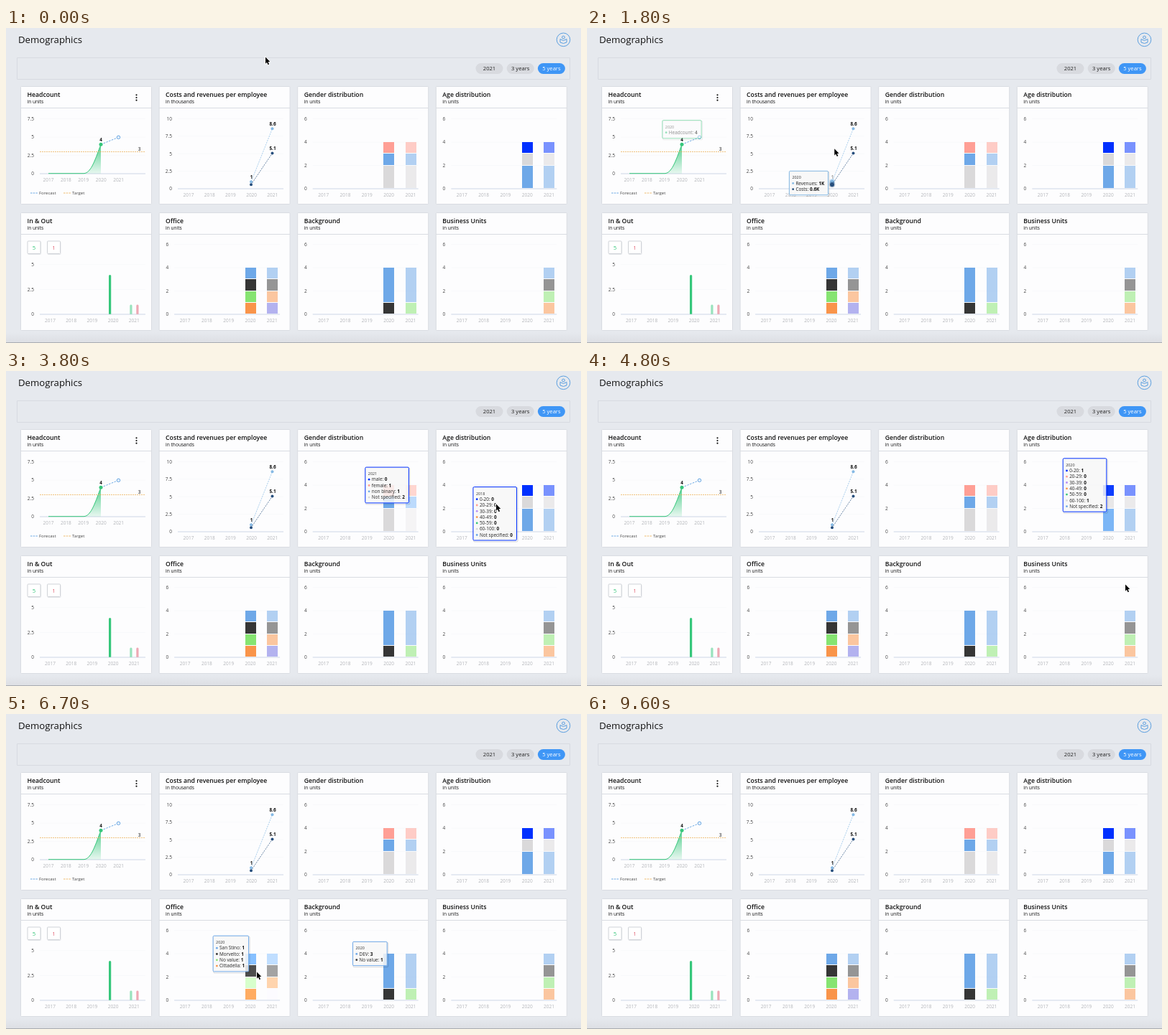
Animation of 800x439 px, one loop 9700 ms. Source, as an HTML page with a canvas:

```html
<!DOCTYPE html>
<html lang="en">
<head>
<meta charset="utf-8">
<title>Demographics</title>
<style>
html, body { margin: 0; width: 100%; height: 100%; overflow: hidden; background: #e6e9ee; }
canvas { display: block; }
</style>
</head>
<body>
<canvas id="stage" width="800" height="439"></canvas>
<script>
const c = document.getElementById('stage').getContext('2d');
const LOOP = 9.7, FONT = '"Open Sans", sans-serif';
const BLUE = '#6ea8e8', GREY = '#dad9da', DARK = '#363636', ORANGE = '#f9944a', LIME = '#86e471',
  GREEN = '#36c77b', ROSE = '#ff9f95', ROYAL = '#0030ff', NAVY = '#274f7d', SKY = '#85b9e4',
  VIOLET = '#6f6de2', RED = '#e0566b', LINK = '#5b9fe0', AMBER = '#eeb45c', CARD = '#fdfdfe';

const clamp = v => Math.max(0, Math.min(1, v));
const smooth = v => (v = clamp(v)) * v * (3 - 2 * v);
const mix = (a, b, k) => a + (b - a) * k;

function faded(alpha, draw) {
  c.save();
  c.globalAlpha *= alpha;
  draw();
  c.restore();
}
function text(s, x, y, size, color = '#111', weight = 400, align = 'left') {
  c.font = `${weight} ${size}px ${FONT}`;
  c.textAlign = align;
  c.fillStyle = color;
  c.fillText(s, x, y);
}
function line(points, color, width = 1, dash = []) {
  c.beginPath();
  points.forEach(p => c.lineTo(...p));
  c.strokeStyle = color;
  c.lineWidth = width;
  c.setLineDash(dash);
  c.stroke();
  c.setLineDash([]);
}
function paint(fill, stroke) {
  if (fill) { c.fillStyle = fill; c.fill(); }
  if (stroke) { c.strokeStyle = stroke; c.lineWidth = 1; c.stroke(); }
}
function rect(x, y, w, h, fill, stroke, r = 0) {
  c.beginPath();
  c.roundRect(x, y, w, h, r);
  paint(fill, stroke);
}
function dot(x, y, r, fill, stroke) {
  c.beginPath();
  c.arc(x, y, r, 0, 7);
  paint(fill, stroke);
}

// hover: [enter, leave, first year, last year]; series: [name, colour, value 2020, value 2021]
const head = { hover: [.7, 1.2, 2020, 2020], base: 203, above: true, series: [['Headcount', GREEN, 4]],
  point: () => [132, 162.3] };
const cost = { hover: [1.6, 2.4, 2020, 2021], base: 224,
  series: [['Revenues', SKY, '1K', '8.6K'], ['Costs', NAVY, '0.6K', '5.1K']],
  point: year => year > 2020 ? [367, 157.4] : [338, 216] };
const flow = { hover: [7.4, 8.6, 2021, 2020], base: 399, series: [['In', GREEN, 4, 1], ['Out', RED, 0, 1]],
  point: year => year > 2020 ? [174, 386] : [145, 344] };

const stacks = [
  { col: 2, row: 0, title: 'Gender distribution', hover: [2.5, 3.5, 2018, 2021],
    series: [['male', ROYAL, 0, 0], ['female', ROSE, 1, 1], ['non binary', BLUE, 1, 1], ['Not specified', GREY, 2, 2]] },
  { col: 3, row: 0, title: 'Age distribution', hover: [3.5, 4.6, 2018, 2020],
    series: [['0-20', ROYAL, 1, 1], ['20-29', ROSE, 0, 0], ['30-39', '#b58cf5', 0, 0], ['40-49', ORANGE, 0, 0],
      ['50-59', GREEN, 0, 0], ['60-100', GREY, 1, 1], ['Not specified', BLUE, 2, 2]] },
  { col: 1, row: 1, title: 'Office', hover: [6.2, 6.8, 2021, 2020],
    series: [['San Stino', BLUE, 1, 1], ['Morvelto', DARK, 1, 1], ['No value', LIME, 1], ['Cittadella', ORANGE, 1, 1],
      ['Remote', VIOLET, null, 1]] },
  { col: 2, row: 1, title: 'Background', hover: [5.5, 6.2, 2021, 2020],
    series: [['DEV', BLUE, 3, 3], ['No value', DARK, 1], ['ADM', LIME, null, 1]] },
  { col: 3, row: 1, title: 'Business Units', hover: [4.9, 5.5, 2021, 2021],
    series: [['Design', BLUE, null, 1], ['Sales', DARK, null, 1], ['No value', LIME, null, 1], ['Support', ORANGE, null, 1]] }
];
for (const s of stacks) {
  s.base = s.row ? 399 : 224;
  s.left = 20.5 + 192.6 * s.col;
  s.point = year => {
    const total = year < 2020 ? 0 : s.series.reduce((sum, row) => sum + (row[year - 2018] || 0), 0);
    return [s.left + 127 + 30.2 * (year - 2020), s.base - 16.25 * total];
  };
}
const charts = [head, cost, flow, ...stacks];

// Years under the pointer with their start and end, evenly spread over the hover
function visits({ hover: [enter, leave, first, last] }) {
  const n = Math.abs(last - first) + 1, step = (leave - enter) / n;
  return Array.from({ length: n }, (_, i) =>
    ({ year: first + i * Math.sign(last - first), from: enter + i * step, to: enter + (i + 1) * step }));
}
function glow(chart, year, t) {
  const v = visits(chart).find(v => v.year === year);
  return v ? clamp((t - v.from) / .15) * (1 - clamp((t - v.to) / .5)) : 0;
}
// Tooltips linger for half a second after the pointer leaves
const presence = ({ hover }, t) => clamp((t - hover[0]) / .15) * (1 - clamp((t - hover[1] - .5) / .2));

function tipBox(chart, year) {
  const rows = chart.series.map(([name, color, ...values]) => [name + ': ', color, year < 2020 ? 0 : values[year - 2020]])
    .filter(row => row[2] != null);
  c.font = `400 6.4px ${FONT}`;
  const w = Math.max(...rows.map(row => c.measureText(row[0] + row[2]).width)) + 14.5;
  const h = 17 + 8.2 * rows.length, [px, py] = chart.point(year);
  const x = chart.above ? px - w / 2 : year < 2020 ? px - 15 : px - 2.5 - w;
  const y = chart.above ? py - 8.5 - h : Math.min(py - h / 2, chart.base + 12 - h);
  return { rows, w, h, x, y };
}

function drawTip(chart, t) {
  const alpha = presence(chart, t);
  if (!alpha) return;
  let box, x, y;
  for (const v of visits(chart)) {
    if (box && t < v.from) break;
    const k = box ? smooth((t - v.from) / .2) : 1;
    box = tipBox(chart, v.year);
    x = mix(x ?? box.x, box.x, k);
    y = mix(y ?? box.y, box.y, k);
    box.year = v.year;
  }
  faded(alpha, () => {
    rect(x + .5, y + 1, box.w + 1, box.h + 1, null, 'rgba(0,0,0,.15)', 1.5);
    rect(x, y, box.w, box.h, 'rgba(247,247,247,.85)', chart.series[0][1], 1.5);
    text(box.year, x + 4, y + 11, 5.4, '#333');
    box.rows.forEach(([label, color, value], i) => {
      const ty = y + 19.3 + 8.3 * i;
      dot(x + 5.3, ty - 2.2, 1.4, color);
      text(label, x + 9, ty, 6.4, '#222');
      text(value, x + 9 + c.measureText(label).width, ty, 6.4, '#111', 700);
    });
  });
}

function card(col, row, title, unit) {
  const x = 20.5 + 192.6 * col, y = 81 + 176 * row;
  rect(x, y + .5, 182, 164, CARD, '#d9dce2', 1);
  line([[x, y + 30.5], [x + 182, y + 30.5]], '#d9dce2');
  text(title, x + 9, y + 15, 8.7, '#111', 600);
  text(unit, x + 9, y + 24, 6.6);
}

function axes(x, base, max, n, step, years, gap, drop = 11) {
  for (let i = 0; i <= n; i++) {
    const y = base - step * i;
    line([[x + 8, y], [x + 155, y]], i ? '#f8f9fb' : '#cdd6e6');
    text(max * i / n, x, y + 2.3, 6.5, '#444', 400, 'right');
  }
  for (let i = 0; i < 5; i++) text(2017 + i, years + gap * i, base + drop, 6.5, '#b3b5b9', 400, 'center');
}

function stackChart(chart, t) {
  const { col, row, title, left, base, series } = chart;
  card(col, row, title, 'in units');
  axes(left + 13, base, 6, 3, 32.5, left + 36, 30.3);
  for (const year of [2020, 2021]) {
    const other = 4041 - year, x = Math.round(chart.point(year)[0] - 7.4);
    let bottom = base;
    for (const [, color, ...values] of [...series].reverse()) {
      const n = values[year - 2020];
      if (!n) continue;
      const top = bottom - 16.25 * n, y = Math.round(top), h = Math.round(bottom) - y - 1;
      // Forecast year is half transparent; series missing from the hovered year recede
      const dim = values[other - 2020] == null ? 1 - .8 * glow(chart, other, t) : 1;
      faded((year > 2020 ? .52 : 1) * dim, () => rect(x, y, 15, h, color));
      const v = Math.round(24 * glow(chart, year, t));
      c.globalCompositeOperation = 'lighter';
      rect(x, y, 15, h, `rgb(${v},${v},${v})`);
      c.globalCompositeOperation = 'source-over';
      bottom = top;
    }
  }
}

function marker(x, y, r, color, on) {
  faded(.25 * on, () => dot(x, y, r * 2.2, color));
  dot(x, y, r * (1 + .5 * on), color);
}

function headcount(t) {
  const on = glow(head, 2020, t);
  card(0, 0, 'Headcount', 'in units');
  for (let i = 0; i < 3; i++) dot(181.5, 93.3 + 3.7 * i, 1.1, '#111');
  axes(39, 203, 7.5, 3, 25.5, 59, 24.4, 10.5);
  const curve = new Path2D('M59 202.7H108C119 202.7 125 180 132 162.3');
  const area = new Path2D(curve);
  area.lineTo(132, 203);
  c.fillStyle = c.createLinearGradient(0, 162, 0, 203);
  c.fillStyle.addColorStop(0, 'rgba(54,199,123,.85)');
  c.fillStyle.addColorStop(1, 'rgba(54,199,123,.1)');
  c.fill(area);
  c.strokeStyle = GREEN;
  c.lineWidth = 1;
  c.stroke(curve);
  line([[47, 172.5], [193, 172.5]], AMBER, .8, [2, 1]);
  text('3', 185.5, 170.8, 6.5, '#111', 400, 'center');
  faded(1 - on, () => {
    line([[132, 162.3], [156.5, 152.3]], LINK, .9, [2.5, 1.5]);
    dot(156.5, 152.3, 2.2, '#fff', LINK);
    text('4', 132, 157.5, 6.2, '#111', 700, 'center');
  });
  marker(132, 162.3, 2.5, GREEN, on);
  [['Forecast', 34, LINK], ['Target', 80, AMBER]].forEach(([s, x, color]) => {
    line([[x, 230], [x + 10, 230]], color, .9, [2.5, 1.2]);
    text(s, x + 12, 232.2, 6, '#444');
  });
}

function costs(t) {
  card(1, 0, 'Costs and revenues per employee', 'in thousands');
  axes(231, 224, 10, 4, 24.4, 254, 29.2);
  for (const [color, y0, y1] of [[SKY, 214.3, 140.3], [NAVY, 218.2, 174.5]]) {
    line([[341, y0], [370.5, y1]], color, .7, [2, 1.2]);
    marker(341, y0, 2, color, glow(cost, 2020, t));
    marker(370.5, y1, 2, color, glow(cost, 2021, t));
  }
  faded(1 - .6 * presence(cost, t), () => text('1', 341.5, 209.5, 6.2, '#111', 700, 'center'));
  text('8.6', 371, 135.8, 6.4, '#111', 700, 'center');
  text('5.1', 371, 169.8, 6.4, '#111', 700, 'center');
}

function inOut() {
  card(0, 1, 'In & Out', 'in units');
  [['5', GREEN], ['1', RED]].forEach(([s, color], i) => {
    const x = 30 + 27.5 * i;
    rect(x + .5, 298, 18, 17.5, null, '#e4e6ea', 1);
    rect(x, 297, 18, 17.5, '#fff', '#d0d3d8', 1);
    text(s, x + 9, 308.8, 7.8, color, 400, 'center');
  });
  axes(39, 399, 5, 2, 34.6, 61.5, 29.2);
  const bar = (x, h, color) => rect(x, 398.7 - h, 3.2, h, color, null, [1.5, 1.5, 0, 0]);
  bar(143, 54.7, GREEN);
  faded(.5, () => {
    bar(172.3, 13.2, GREEN);
    bar(181.3, 13.2, RED);
  });
}

function header() {
  rect(0, 0, 800, 439, '#e6e9ee');
  const shade = c.createLinearGradient(0, 424, 0, 438);
  shade.addColorStop(0, '#e6e9ee');
  shade.addColorStop(1, '#dddfe4');
  rect(0, 424, 800, 14, shade);
  rect(0, 438, 800, 1, '#a9acb1');
  text('Demographics', 17, 21.3, 13.2);
  rect(15.5, 41.5, 769, 30, null, '#d7dae1');
  ['2021', '3 years', '5 years'].forEach((s, i) => {
    const x = 653.5 + 43.2 * i;
    rect(x, 49, 38, 15, i === 2 ? '#3f96f6' : '#d8dadf', null, 7.5);
    text(s, x + 19, 59.4, 7.6, i === 2 ? '#fff' : '#222', 400, 'center');
  });
  dot(775.5, 16.3, 9.3, null, LINK);
  dot(775.5, 13, 1.9, null, LINK);
  c.strokeStyle = LINK;
  c.stroke(new Path2D('M771 15.5l4.5 2 4.5-2v4.5l-4.5 1.5-4.5-1.5z'));
}

// Pointer stops: [time, x, y]
const path = [[.1, 361, 41], [1, 131, 175], [2, 369, 168], [2.7, 481, 160], [3.4, 562, 178], [3.8, 682, 186],
  [4.4, 728, 184], [4.8, 749, 298], [5.3, 755, 364], [6.7, 349, 360], [7.5, 178, 380], [8.5, 143, 365], [9.4, 230, 100]];
const arrow = new Path2D('M0-.5V8.7L2 6.8 3.5 10.2 5.1 9.5 3.6 6.2 6.3 6z');

function pointer(t) {
  const i = Math.max(1, path.findIndex(p => p[0] > t));
  if (t >= path.at(-1)[0]) return;
  const [t0, x0, y0] = path[i - 1], [t1, x1, y1] = path[i], k = smooth((t - t0) / (t1 - t0));
  c.save();
  c.translate(mix(x0, x1, k), mix(y0, y1, k));
  c.strokeStyle = '#fff';
  c.lineWidth = 1.5;
  c.stroke(arrow);
  c.fillStyle = '#000';
  c.fill(arrow);
  c.restore();
}

function draw(t) {
  header();
  headcount(t);
  costs(t);
  inOut();
  stacks.forEach(s => stackChart(s, t));
  charts.forEach(chart => drawTip(chart, t));
  pointer(t);
}

const start = performance.now();
function tick() {
  const t = (performance.now() - start) / 1000 % LOOP;
  draw(Math.floor(t * 10) / 10);
  requestAnimationFrame(tick);
}
tick();
</script>
</body>
</html>
```
